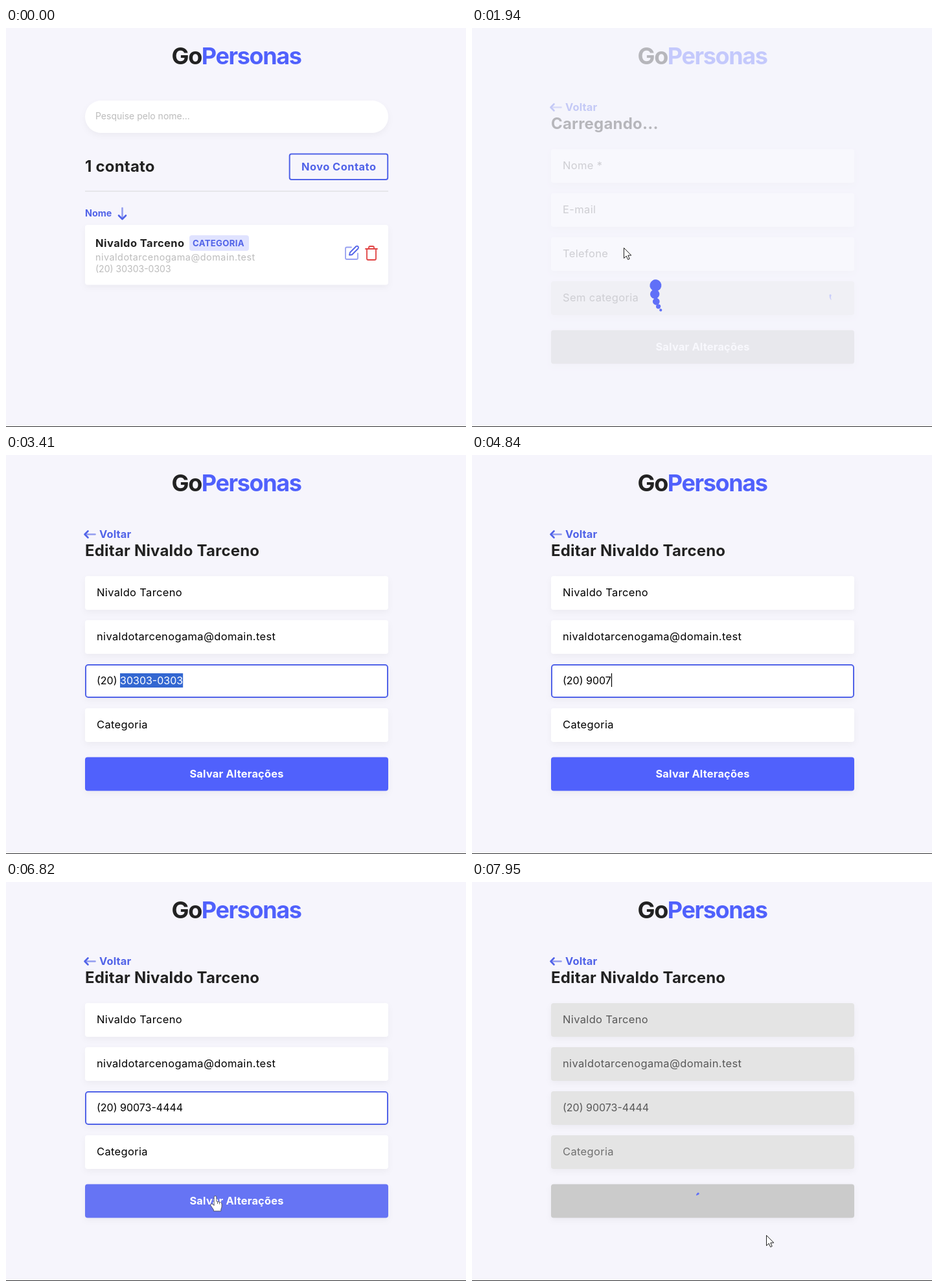
Animation, 710 px wide and 616 px high, one loop 8 s. Source, as an HTML page:

```html
<!DOCTYPE html>
<html lang="pt-BR">
<head>
<meta charset="utf-8">
<title>Contatos</title>
<style>
html, body { margin: 0; width: 100%; height: 100%; overflow: hidden; background: #f6f5fc; }
svg { display: block; width: 710px; height: 616px; font-family: Inter, "Open Sans", sans-serif; }
text { white-space: pre; }
.b { font-weight: 700; }
.h { font-size: 24px; font-weight: 700; letter-spacing: .2px; fill: #222; }
.logo { font-size: 36px; font-weight: 700; letter-spacing: -1.4px; fill: #222; }
.main { fill: #5061fc; }
.link { fill: #5163e8; }
.muted { fill: #bcbcbc; }
.field { font-size: 16.5px; letter-spacing: .35px; }
.label { font-size: 16.4px; font-weight: 700; letter-spacing: .2px; }
.line { fill: none; stroke: #5163e8; stroke-width: 2.6; stroke-linecap: round; stroke-linejoin: round; }
.pale { opacity: .6; }
.box { filter: drop-shadow(0 4px 5px rgba(0, 0, 0, .04)); }
</style>
</head>
<body>
<svg viewBox="0 0 710 616">
  <text class="logo" x="355.5" y="56" text-anchor="middle">Go<tspan class="main">Personas</tspan></text>

  <g id="list">
    <rect class="box" x="122" y="112" width="468" height="50" rx="25" fill="#fff"/>
    <text class="muted" x="138" y="141" font-size="14">Pesquise pelo nome...</text>
    <text class="h" x="122" y="222">1 contato</text>
    <rect x="437.700" y="194.600" width="151.500" height="39.500" rx="3" fill="none" stroke="#5163e8" stroke-width="2"/>
    <text class="label link" x="513.7" y="220" text-anchor="middle" style="letter-spacing:.5px">Novo Contato</text>
    <rect x="122" y="251" width="468" height="2" fill="#e6e6ea"/>
    <text class="b link" x="122" y="291" font-size="14.3">Nome</text>
    <path class="line pale" d="M179.500 278V293"/>
    <path class="line" d="M174 289.500L179.500 295L185 289.500"/>
    <rect class="box" x="122" y="304" width="468" height="92.500" rx="4" fill="#fff"/>
    <text class="b" x="138" y="338" font-size="16.5" letter-spacing=".45" fill="#222">Nivaldo Tarceno</text>
    <rect x="283" y="320" width="92" height="24" rx="4" fill="#e0e3ff"/>
    <text class="b link" x="288" y="336.500" font-size="13.2" letter-spacing=".3">CATEGORIA</text>
    <text class="muted" x="138" y="359" font-size="14.4" letter-spacing=".5">nivaldotarcenogama@domain.test</text>
    <text class="muted" x="138" y="376.500" font-size="14">(20) 30303-0303</text>
    <g class="line" style="stroke-width:1.8">
      <path class="pale" d="M533 338.500H526Q524 338.500 524 340.500V355Q524 357 526 357H541Q543 357 543 355V348"/>
      <path d="M530 350.500L531 346.500L540.500 337Q542 336 543.500 337.500Q544.500 339 543.500 340.500L534 350Z"/>
    </g>
    <path class="line" style="stroke:#e04444;stroke-width:1.8" d="M555 341H573M557 341V356Q557 358 559 358H569Q571 358 571 356V341M560 341V339Q560 337 562 337H566Q568 337 568 339V341"/>
  </g>

  <g id="form">
    <path class="line pale" d="M123 122.500H137.500"/>
    <path class="line" d="M126.500 117.500L121.500 122.500L126.500 127.500"/>
    <text class="label link" x="144" y="128">Voltar</text>
    <text class="h" id="title" x="122" y="156"></text>
    <g id="fields"></g>
    <rect id="mark" y="337" height="22" fill="#3367d1"/>
    <text class="field" id="phone" x="140" y="354" style="font-size:16px;letter-spacing:0"><tspan></tspan><tspan fill="#fff"></tspan><tspan></tspan></text>
    <rect id="caret" y="337" width="1.2" height="21"/>
    <rect class="box" id="button" x="122" y="466.500" width="468" height="52" rx="4"/>
    <text class="label" id="save" x="356" y="497.500" text-anchor="middle" fill="#fff">Salvar Alterações</text>
    <g id="selectSpin"></g>
    <g id="saveSpin"></g>
  </g>

  <g id="overlay">
    <rect width="710" height="616" fill="#f6f5fc" opacity=".7"/>
    <g id="pageSpin"></g>
  </g>

  <rect y="615" width="710" height="1" fill="#333"/>
  <g id="cursor" fill="#fff" stroke-linejoin="round">
    <path id="arrow" stroke="#222" d="M.5.500V16.500L4.200 13L6.700 18.500L9.200 17.400L6.800 12H11.800Z"/>
    <path id="hand" stroke="#444" stroke-width=".8" d="M-1.800.500A1.800 1.800 0 0 1 1.800.500V7L8.300 8.600Q10 9.200 10 11V15Q10 17 8.800 19V22H-2.600V20L-7 13.500Q-7.800 11.200-6 10.800Q-4.400 10.800-1.800 13.400ZM3.500 7.600V11M6.500 8.400V11.500"/>
  </g>
</svg>
<script>
const LOOP = 8000, OPEN = 1160, LOADED = 2200, FOCUS = 2790, ERASE = 4100, CLICK = 6900;
const SPIN_LEAD = 45; // spinners are already turning when first seen
const PREFIX = '(20) ', OLD = '30303-0303', NEW = '900734444';
const KEYS = [4480, 4600, 4720, 4840, 4960, 5160, 5360, 5560, 5760];
const MOVES = [[270, 700, 616], [860, 532, 347], [1200, 532, 347], [1940, 234, 339], [2200, 176, 345],
  [5910, 300, 376], [6500, 323, 486], [6920, 323, 486], [7570, 454, 545]];

const $ = id => document.getElementById(id);
const show = (el, on) => { el.style.display = on ? '' : 'none'; };
const clamp = v => Math.min(1, Math.max(0, v));
const smooth = v => v * v * (3 - 2 * v);

// CSS "ease": cubic-bezier(.25, .1, .25, 1)
function ease(x) {
  const curve = (u, a, b) => 3 * u * (1 - u) ** 2 * a + 3 * u * u * (1 - u) * b + u ** 3;
  let lo = 0, hi = 1;
  for (let i = 0; i < 18; i++) {
    const mid = (lo + hi) / 2;
    if (curve(mid, .25, .25) < x) lo = mid; else hi = mid;
  }
  return curve(lo, .1, 1);
}

// Interpolates rows of [time, ...values]
function track(rows, t, easing) {
  let i = 0;
  while (i < rows.length - 2 && t >= rows[i + 1][0]) i++;
  const a = rows[i], b = rows[i + 1];
  const k = easing(clamp((t - a[0]) / (b[0] - a[0])));
  return a.slice(1).map((v, j) => v + (b[j + 1] - v) * k);
}

// Five balls chasing each other; they move in straight lines between key angles
const RADII = [.1, .08, .06, .04, .023], LAG = [0, 27, 51, 69, 84];
const SPREAD = [[0, 0], [.05, 0], [.1, .24], [.2, .82], [.38, 1], [.59, .24], [.95, 0], [1, 0]];
const PATHS = LAG.map(lag => SPREAD.map(([p, k]) => {
  const angle = lag * k * Math.PI / 180;
  return [p, -.83 * Math.sin(angle), -.83 * Math.cos(angle)];
}));

function spinner(id, x, y, em) {
  const el = $(id);
  el.setAttribute('fill', '#6070f8');
  el.innerHTML = RADII.map(r => `<circle r="${r}"/>`).join('');
  return age => {
    const p = (age + SPIN_LEAD) / 1700 % 1;
    el.setAttribute('transform', `translate(${x} ${y}) rotate(${360 * ease(p)}) scale(${em})`);
    [...el.children].forEach((c, i) => {
      const [cx, cy] = track(PATHS[i], p, ease);
      c.setAttribute('cx', cx);
      c.setAttribute('cy', cy);
    });
  };
}

const pageSpin = spinner('pageSpin', 356, 415, 90);
const selectSpin = spinner('selectSpin', 566, 416, 16);
const saveSpin = spinner('saveSpin', 356, 492.5, 16);

const FIELDS = [['Nome *', 'Nivaldo Tarceno'], ['E-mail', 'nivaldotarcenogama@domain.test'],
  ['Telefone', ''], ['Sem categoria', 'Categoria']];
$('fields').innerHTML = FIELDS.map((f, i) => `<rect class="box" x="122" y="${187 + 68 * i}" width="468" height="52" rx="4"/>
  <text class="field" x="140" y="${218 + 68 * i}"></text>`).join('');
const boxes = document.querySelectorAll('#fields rect'), values = document.querySelectorAll('#fields text');
const phone = $('phone'), parts = phone.children;

function drawFields(loaded, saving) {
  FIELDS.forEach((f, i) => {
    const off = saving || (i === 3 && !loaded);
    boxes[i].setAttribute('fill', off ? '#e4e4e4' : '#fff');
    values[i].textContent = f[+loaded];
    values[i].setAttribute('fill', !loaded ? '#737373' : !saving ? '#000' : i === 3 ? '#707070' : '#585858');
  });
}

function drawPhone(t, loaded, saving) {
  const focus = t >= FOCUS && !saving;
  const box = boxes[2], inset = focus ? 1 : 0;
  box.setAttribute('stroke', focus ? '#5163e8' : 'none');
  box.setAttribute('stroke-width', 2);
  box.setAttribute('x', 122 + inset);
  box.setAttribute('y', 323 + inset);
  box.setAttribute('width', 468 - 2 * inset);
  box.setAttribute('height', 52 - 2 * inset);

  const digits = NEW.slice(0, KEYS.filter(k => t >= k).length);
  const number = t < ERASE ? OLD : digits.length > 5 ? digits.slice(0, 5) + '-' + digits.slice(5) : digits;
  const picked = t < ERASE ? Math.round(10 * clamp((t - FOCUS) / 550)) : 0;
  parts[0].textContent = PREFIX;
  parts[1].textContent = number.slice(0, picked);
  parts[2].textContent = number.slice(picked);
  phone.setAttribute('fill', saving ? '#585858' : '#000');
  show(phone, loaded);

  show($('mark'), picked);
  if (picked) {
    $('mark').setAttribute('x', 140 + phone.getSubStringLength(0, 5));
    $('mark').setAttribute('width', phone.getSubStringLength(5, picked));
  }
  const last = Math.max(ERASE, ...KEYS.filter(k => t >= k));
  const lit = focus && t >= ERASE && Math.floor((t - last) / 560) % 2 === 0;
  show($('caret'), lit);
  if (lit) $('caret').setAttribute('x', 140 + phone.getComputedTextLength());
}

function drawCursor(t) {
  const [x, y] = track(MOVES, t, smooth);
  const onButton = t > 5910 && t < CLICK && y > 466;
  const hand = onButton || (t > 800 && t < OPEN);
  show($('cursor'), (t >= 270 && t < 2300) || t >= 5910);
  $('cursor').setAttribute('transform', `translate(${x} ${y})`);
  show($('hand'), hand);
  show($('arrow'), !hand);
  return onButton;
}

function draw(t) {
  const open = t >= OPEN, loaded = t >= LOADED, saving = t >= CLICK;
  show($('list'), !open);
  show($('form'), open);
  const hover = drawCursor(t);
  if (open) {
    $('title').textContent = loaded ? 'Editar Nivaldo Tarceno' : 'Carregando...';
    drawFields(loaded, saving);
    drawPhone(t, loaded, saving);
    $('button').setAttribute('fill', !loaded || saving ? '#cbcbcb' : hover ? '#6674f4' : '#5061fc');
    show($('save'), !saving);
    show($('selectSpin'), !loaded);
    show($('saveSpin'), saving);
    selectSpin(t - OPEN);
    if (saving) saveSpin(t - CLICK);
  }
  const fade = clamp((t - OPEN - 20) / 300) * (1 - clamp((t - LOADED) / 300));
  show($('overlay'), fade > 0);
  $('overlay').setAttribute('opacity', fade);
  if (fade > 0) pageSpin(t - OPEN);
}

const start = performance.now();
function tick() {
  draw((performance.now() - start) % LOOP);
  requestAnimationFrame(tick);
}
tick();
</script>
</body>
</html>
```
